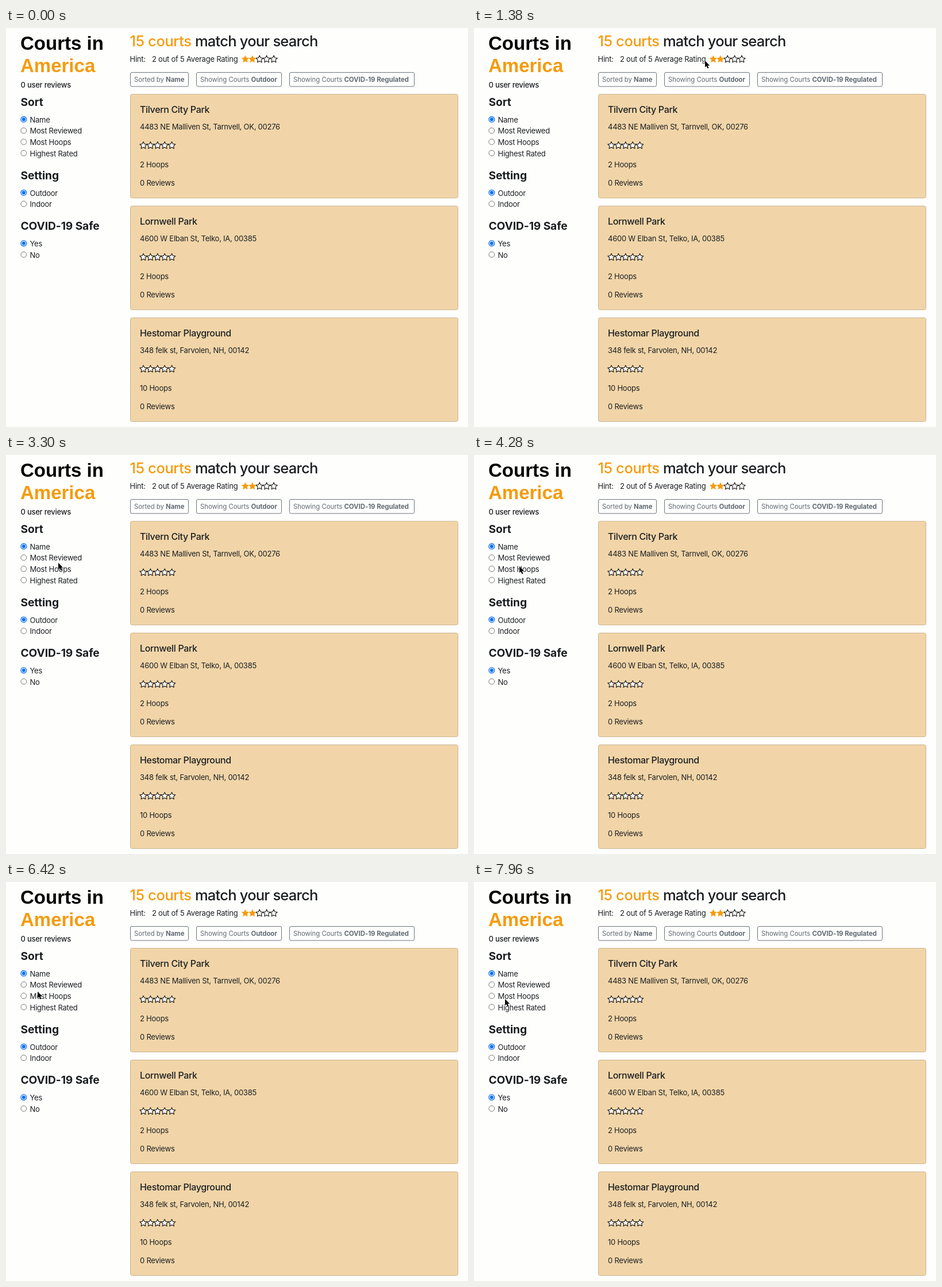
An HTML page for the animation above (8000 ms loop, 804 by 696 pixels).

```html
<!DOCTYPE html>
<html lang="en">
<head>
<meta charset="utf-8">
<title>Court finder</title>
<style>
  html, body { margin: 0; width: 100%; height: 100%; overflow: hidden; background: #fefefd; }
  svg { display: block; width: 804px; height: 696px; }
  text { font: 400 13px Inter, sans-serif; font-optical-sizing: none; fill: #1b1e21; letter-spacing: -.24px; white-space: pre; }
  .brand { font: 700 33px "Liberation Sans", Arial, sans-serif; fill: #000; letter-spacing: 0; }
  .count { font-weight: 500; }
  .group { font-size: 19.2px; font-weight: 700; letter-spacing: -.1px; }
  .headline { font-size: 25.5px; font-weight: 500; letter-spacing: -.78px; }
  .total { letter-spacing: -.4px; }
  .name { font-size: 16px; font-weight: 500; letter-spacing: -.34px; }
  .badge { font-size: 11.4px; fill: #626b73; letter-spacing: -.03px; }
  .badge tspan { font-weight: 700; }
  .accent { fill: #f59b0e; }
</style>
</head>
<body>
<svg id="stage" viewBox="0 0 804 696"></svg>
<script>
const LOOP = 8000;
const ORANGE = '#f59b0e';
const stage = document.getElementById('stage');

function add(tag, attrs, content = '') {
  const node = document.createElementNS('http://www.w3.org/2000/svg', tag);
  for (const key in attrs) node.setAttribute(key, attrs[key]);
  node.textContent = content;
  return stage.appendChild(node);
}

const label = (x, y, content, cls = '') => add('text', { x, y, class: cls }, content);

function star(cx, cy, filled) {
  const points = Array.from({ length: 10 }, (_, i) => {
    const r = i % 2 ? 3.2 : 6.5;
    const a = (i / 5 - .5) * Math.PI;
    return (cx + r * Math.cos(a)).toFixed(2) + ',' + (cy + r * Math.sin(a)).toFixed(2);
  }).join(' ');
  add('polygon', {
    points, fill: filled ? ORANGE : '#fff',
    stroke: filled ? ORANGE : '#111', 'stroke-width': filled ? .5 : 1.1, 'stroke-linejoin': 'round'
  });
}

function stars(x, y, score) {
  for (let i = 0; i < 5; i++) star(x + i * 12.4, y, i < score);
}

function radios(title, titleY, firstY, options) {
  label(25.5, titleY, title, 'group');
  options.forEach((option, i) => {
    const cy = firstY + i * 19.6;
    const on = i === 0;
    add('circle', { cx: 30.8, cy, r: 4.9, fill: '#fff', stroke: on ? '#0d72ee' : '#767676', 'stroke-width': on ? 1.3 : 1 });
    if (on) add('circle', { cx: 30.8, cy, r: 3.1, fill: '#0d72ee' });
    label(41.5, cy + 5.4, option);
  });
}

function badge(x, width, lead, value) {
  add('rect', { x: x + .5, y: 77.5, width, height: 24.5, rx: 2.5, fill: 'none', stroke: '#6c757d' });
  const text = label(x + 7, 94, lead + ' ', 'badge');
  text.appendChild(add('tspan', {}, value));
}

function card(y, name, address, hoops) {
  add('rect', { x: 216.5, y: y + .5, width: 570, height: 181, rx: 3, fill: '#f1d5a8', stroke: '#cbb591' });
  label(233, y + 33.4, name, 'name');
  label(233, y + 62, address);
  stars(239, y + 89.9, 0);
  label(233, y + 127.6, hoops + ' Hoops');
  label(233, y + 160.3, '0 Reviews');
}

label(25, 38, 'Courts in', 'brand');
label(25, 77, 'America', 'brand accent');
label(25.5, 104, '0 user reviews', 'count');
radios('Sort', 136, 159.4, ['Name', 'Most Reviewed', 'Most Hoops', 'Highest Rated']);
radios('Setting', 264, 287.2, ['Outdoor', 'Indoor']);
radios('COVID-19 Safe', 352, 375.6, ['Yes', 'No']);

label(215.5, 32, '15 courts', 'headline total accent');
label(329, 32, 'match your search', 'headline');
label(215.5, 59, 'Hint:');
label(254, 59, '2 out of 5 Average Rating');
stars(416.4, 54.6, 2);

badge(216, 101, 'Sorted by', 'Name');
badge(331, 148, 'Showing Courts', 'Outdoor');
badge(493, 217, 'Showing Courts', 'COVID-19 Regulated');

card(115, 'Tilvern City Park', '4483 NE Malliven St, Tarnvell, OK, 00276', 2);
card(310, 'Lornwell Park', '4600 W Elban St, Telko, IA, 00385', 2);
card(505, 'Hestomar Playground', '348 felk st, Farvolen, NH, 00142', 10);

const cursor = add('path', {
  d: 'M0 0V11.6L2.6 9.2 4.5 13.6 6.5 12.7 4.6 8.4H8.2Z',
  fill: '#000', stroke: '#fff', 'stroke-width': 1, 'stroke-linejoin': 'round', 'paint-order': 'stroke'
});

// Pointer path: time, x, y
const path = [
  [300, 780, 696], [1000, 412, 72], [1380, 402, 57], [1800, 390, 66],
  [2600, 136, 174], [3500, 84, 190], [4280, 79, 194], [4800, 55, 192],
  [5580, 65, 187], [6300, 55, 191], [6900, 55, 190], [7360, 58, 189],
  [7700, 52, 198], [7960, 54, 204], [LOOP, 54, 204]
];

// The pointer advances in small ticks with two short holds per cycle.
function tick(t) {
  const u = (t + 760) % 840;
  const held = u >= 740 ? 740 : u >= 460 && u < 560 ? 460 : Math.floor(u / 20) * 20;
  return Math.max(0, t - u + held);
}

function render(time) {
  const t = tick(time % LOOP);
  const next = path.findIndex(p => p[0] > t);
  cursor.setAttribute('visibility', next < 1 ? 'hidden' : 'visible');
  if (next < 1) return;
  const [t0, x0, y0] = path[next - 1];
  const [t1, x1, y1] = path[next];
  const k = (t - t0) / (t1 - t0);
  const e = k * k * (3 - 2 * k);
  const x = Math.round(x0 + (x1 - x0) * e);
  const y = Math.round(y0 + (y1 - y0) * e);
  cursor.setAttribute('transform', `translate(${x} ${y})`);
}

const start = performance.now();
function loop() {
  render(performance.now() - start);
  requestAnimationFrame(loop);
}
loop();
</script>
</body>
</html>
```
